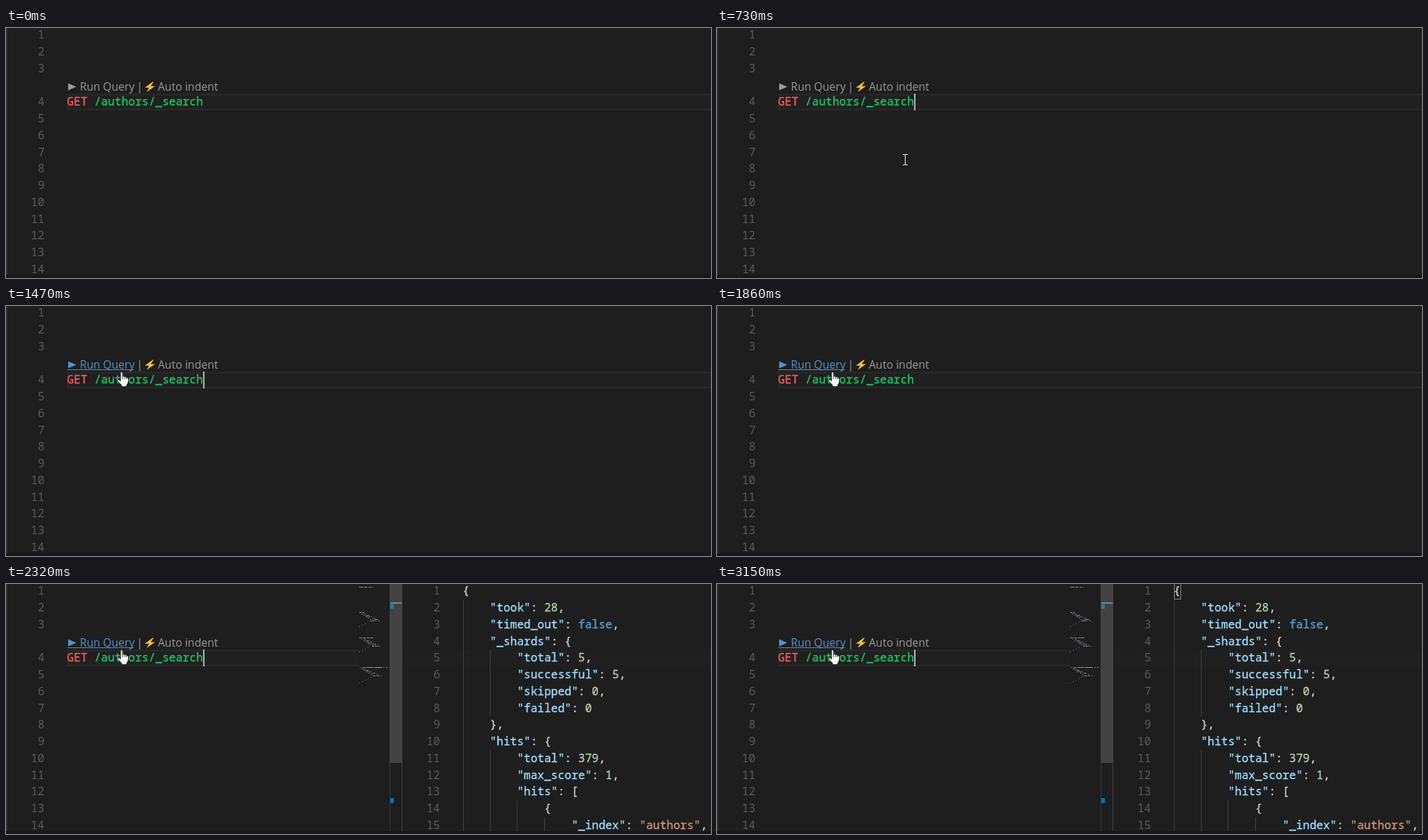
An HTML page that plays this animation: 998x355 px, repeating every 3.63 s.

```html
<!DOCTYPE html>
<html lang="en">
<head>
<meta charset="utf-8">
<title>Run query</title>
<style>
html, body { margin: 0; width: 100%; height: 100%; overflow: hidden; background: #1e1e1e; }
svg { display: block; width: 998px; height: 355px; }
text { white-space: pre; }
.code { font: 16.04px "Noto Sans Mono", "DejaVu Sans Mono", monospace; }
.code tspan { stroke-width: .35px; }
.num { fill: #5a5a5a; text-anchor: end; }
.lens { font: 15.6px "Open Sans", "Noto Sans", sans-serif; fill: #999; }
.hover { fill: #4e94ce; }
rect { shape-rendering: crispEdges; }
</style>
</head>
<body>
<svg viewBox="0 0 998 355">
  <rect width="998" height="355" fill="#1e1e1e"/>
  <rect width="2" height="355" fill="#303030"/>
  <path id="current" fill="#202020" stroke="#292929" stroke-width="2.5"/>
  <g id="left" class="code"></g>

  <g id="run" class="lens">
    <path d="M88 78.5 L99.5 83.5 L88 88.5 Z"/>
    <text x="104.5" y="89">Run Query</text>
    <rect id="underline" x="87" y="90" width="94" height="1"/>
  </g>
  <g class="lens">
    <text x="185" y="89">|</text>
    <text x="215" y="89">Auto indent</text>
  </g>
  <path d="M207.5 76.5 L196.5 84.8 H202.5 L199 91 L211 82.5 H205 L209 76.5 Z"
        fill="#ffc02e" stroke="#111" stroke-width="1" paint-order="stroke"/>

  <g id="split">
    <g id="minimap"></g>
    <rect x="543" y="254" width="1" height="101" fill="#383838"/>
    <rect x="543" width="17" height="254" fill="#434343"/>
    <rect x="544" y="26" width="16" height="2" fill="#858585"/>
    <rect x="544" y="27" width="5" height="8" fill="#2d75ab"/>
    <rect x="544" y="304" width="5" height="7" fill="#0871bd"/>
    <rect x="560" width="1" height="355" fill="#444"/>
    <rect x="567" y="94" width="431" height="22" fill="#202020"/>
    <path id="empty" d="M1000 -1 H648.5 V20.5 H1000" fill="none" stroke="#292929" stroke-width="2.5"/>
    <text class="code num" x="614.5" y="15">1</text>
    <g id="json" class="code">
      <rect id="bracket" x="647.5" y="-2.5" width="9" height="24" fill="none" stroke="#888"/>
    </g>
  </g>

  <rect id="caret" x="279" y="93" width="2" height="24" fill="#b4b4b2"/>
  <g id="beam" fill="none">
    <path id="beamShape" stroke="#111" stroke-width="2.4"/>
    <path id="beamCore" stroke="#eee" stroke-width="1.1"/>
  </g>
  <g id="hand" transform="translate(157 93)" stroke="#111">
    <path fill="#fff"
          d="M5 1.8 Q5 .5 6.5 .5 Q8 .5 8 1.8 V7 Q9.8 5.8 11 7.4 Q12.7 6.7 13.6 8.2 Q16 8 16.3 10.5 V14
             Q16 17 14 19 V21.5 H6.5 V19.5 L1 13.5 Q-.2 11.5 1.5 11 Q3 11 5 13.5 Z"/>
    <path d="M8 7 V11 M11 7.4 V11 M13.6 8.2 V11" fill="none" stroke-width=".8"/>
  </g>
  <rect y="351" width="998" height="4" fill="#191519"/>
</svg>
<script>
const NS = "http://www.w3.org/2000/svg";
const LOOP = 3630, ROW = 23.75, CHAR = 9.62;
const $ = id => document.getElementById(id);

function add(parent, tag, attrs, text) {
  const el = document.createElementNS(NS, tag);
  for (const k in attrs) el.setAttribute(k, attrs[k]);
  if (text !== undefined) el.textContent = text;
  parent.append(el);
  return el;
}

const baseline = row => Math.round(15.4 + row * ROW);
const span = (text, fill, s) => add(text, "tspan", { fill, stroke: fill }, s);
const show = (id, on) => { $(id).style.display = on ? "" : "none"; };

for (const id of ["beamShape", "beamCore"])
  $(id).setAttribute("d", "M-3.5 -7.5 H-1 L0 -6.5 L1 -7.5 H3.5 M0 -6.5 V6.5 M-3.5 7.5 H-1 L0 6.5 L1 7.5 H3.5");

// Left editor; the lens takes the row above line 4.
for (let n = 1; n <= 14; n++)
  add($("left"), "text", { class: "num", x: 54.5, y: baseline(n < 4 ? n - 1 : n) }, n);
const query = add($("left"), "text", { x: 86.5, y: baseline(4) });
span(query, "#f55c5c", "GET");
span(query, "#13c964", " /authors/_search");

// Result pane
const lines = `{
    "took": 28,
    "timed_out": false,
    "_shards": {
        "total": 5,
        "successful": 5,
        "skipped": 0,
        "failed": 0
    },
    "hits": {
        "total": 379,
        "max_score": 1,
        "hits": [
            {
                "_index": "authors",`.split("\n");

function color(token, rest) {
  if (token[0] === '"') return rest[0] === ":" ? "#9cdcfe" : "#ce9178";
  if (/^\d/.test(token)) return "#b5cea8";
  return token === "false" ? "#569cd6" : "#d4d4d4";
}

lines.forEach((line, row) => {
  const indent = line.search(/\S/), body = line.trim();
  for (let i = 0; i < indent; i += 4)
    add($("json"), "rect", { x: Math.floor(647 + i * CHAR), y: row * ROW - 1.8, width: 1, height: ROW + .1, fill: "#404040" });
  if (row) add($("json"), "text", { class: "num", x: 614.5, y: baseline(row) }, row + 1);
  const text = add($("json"), "text", { x: 646.5 + indent * CHAR, y: baseline(row) });
  for (const m of body.matchAll(/"[^"]*"|\d+|false|[^"\df]+/g))
    span(text, color(m[0], body.slice(m.index + m[0].length)), m[0]);
});

// Minimap: one request line, then a body that indents, widens and closes.
let seed = 7;
const rand = () => (seed = seed * 16807 % 2147483647) / 2147483647;

function dots(x, y, width, tint) {
  for (let i = 0; i < width; i++)
    if (rand() < .8)
      add($("minimap"), "rect", { x: x + i, y, width: 1, height: 1, fill: tint, opacity: .45 + rand() * .5 });
}

function block(y, rows, head) {
  dots(500, y, head, "#b4b4b4");
  const peak = Math.ceil(rows / 2);
  for (let i = 1; i < rows; i++) {
    const x = 500 + Math.min(i * 3, (rows - 1 - i) * 4);
    dots(x, y + i * 2, i > peak ? 1 : 4 + i * 1.6, i % 2 ? "#7fabc2" : "#99a3a3");
  }
}
block(4, 1, 20);
block(40, 11, 8);
block(76, 11, 20);
block(118, 12, 42);

// Pointer: time, x, y
const path = [
  [290, 600, 346], [360, 545, 318], [430, 478, 285], [510, 405, 250],
  [580, 340, 220], [650, 295, 198], [730, 266.5, 187], [810, 262, 203],
  [890, 251, 219], [970, 236, 203], [1040, 221, 174], [1110, 208, 147],
  [1180, 197, 124], [1250, 188, 107], [1330, 179, 100], [1410, 170.5, 97]
];
const blinks = [360, 890, 1410, 1860, 2240, 2690, 3150];
const HOVER = 1470, SPLIT = 2240, RESULT = 2320, MATCH = 2400;

function draw(t) {
  const hover = t >= HOVER, split = t >= SPLIT;
  const at = path.findLast(p => p[0] <= t);
  show("beam", at && !hover);
  if (at) $("beam").setAttribute("transform", `translate(${at[1]} ${at[2]})`);
  show("hand", hover);
  show("underline", hover);
  $("run").classList.toggle("hover", hover);
  show("caret", blinks.filter(b => b <= t).length % 2);
  const end = split ? 500 : 1000;
  $("current").setAttribute("d", `M${end} 94.5 H87.5 V115.7 H${end}`);
  show("split", split);
  show("empty", t < RESULT);
  show("json", t >= RESULT);
  show("bracket", t >= MATCH);
}

const start = performance.now();
function tick() {
  draw((performance.now() - start) % LOOP);
  requestAnimationFrame(tick);
}
tick();
</script>
</body>
</html>
```
